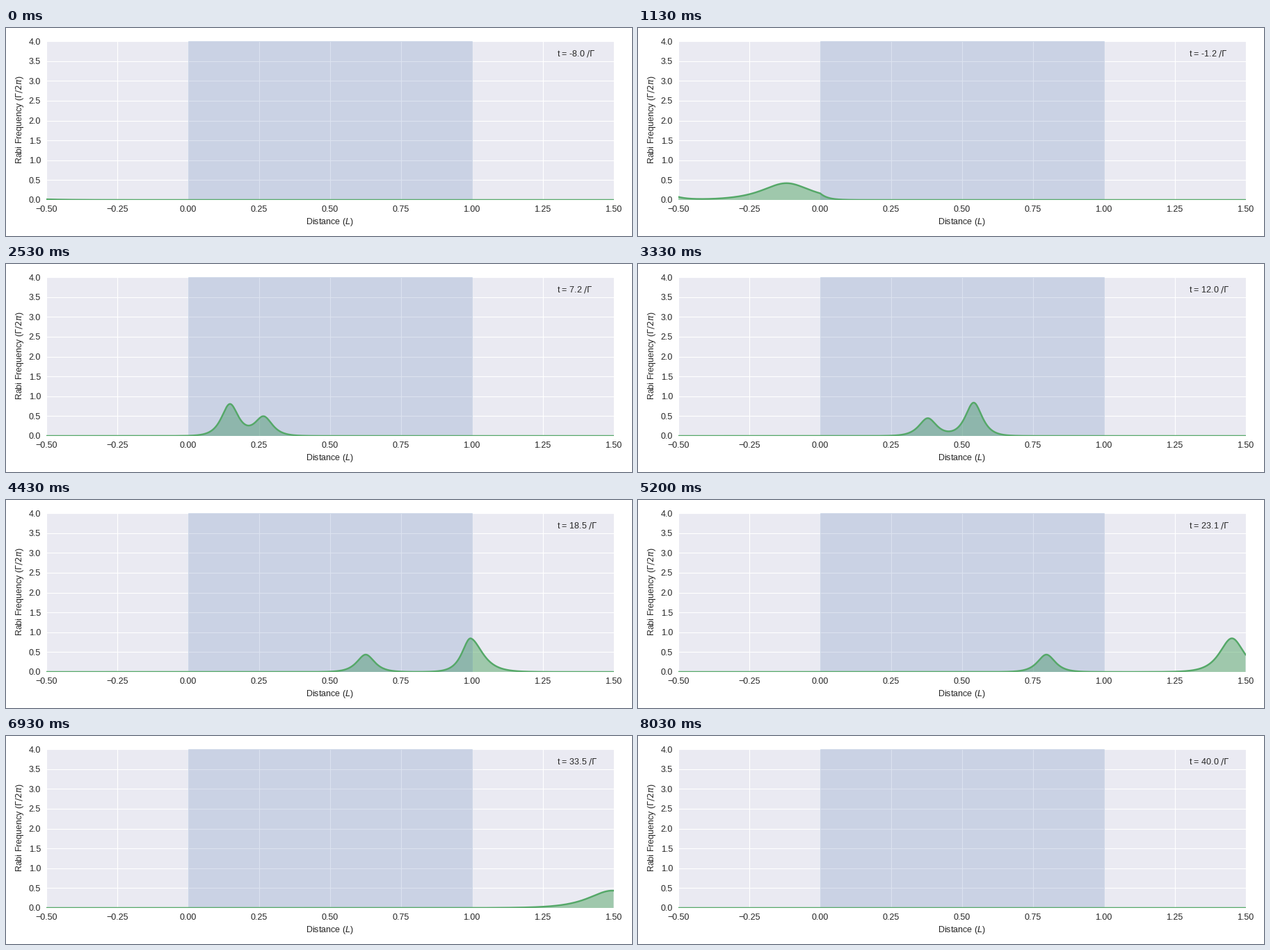
These frames come from a looping animation (900 px wide and 300 px high, 8060 ms). A matplotlib script:

```python
import numpy as np
import matplotlib.pyplot as plt
from matplotlib.animation import FuncAnimation

W, H, DPI = 900, 300, 100
LOOP_MS, TICK_MS = 8060, 20
STEP_MS, STEPS = 100 / 3, 242
LEFT, RIGHT, TOP, BOTTOM = 58, 873.5, 19, 248

C = 0.1                  # vacuum speed, medium lengths per unit time
W1, W2 = 1.3716, 2.66    # inverse durations of the slow and fast pulse
GAP = 5.0                # entry delay of the fast pulse
LAG1, LAG2 = 16.7, 4.45  # delay per medium length

BLUE, GREEN, INK = "#4C72B0", "#55A868", "#262626"

plt.rcParams.update({
    "font.family": "Liberation Sans",
    "font.size": 9,
    "mathtext.fontset": "dejavusans",
    "text.color": INK,
})


def rabi(z, t):
    """Two colliding 2-pi pulses: vacuum, medium on 0..1, vacuum."""
    tau = t - z / C
    depth = np.clip(z, 0, 1)
    settle = 1 - np.exp(-depth / 0.05)
    w1 = W1 - 0.045 * (1 - settle)
    a = (W2 - w1) / (W2 + w1)
    e1 = np.exp(w1 * (tau - LAG1 * depth - 0.15 * settle))
    e2 = np.exp(W2 * (tau - GAP - LAG2 * depth)) / a**2
    f, df = e1 + e2, w1 * e1 + W2 * e2
    cross = a**2 * e1 * e2
    g, dg = 1 - cross, -(w1 + W2) * cross
    return 4 * (df * g - f * dg) / (f**2 + g**2) / (2 * np.pi)


fig = plt.figure(figsize=(W / DPI, H / DPI), dpi=DPI, facecolor="white")
ax = fig.add_axes([LEFT / W, 1 - BOTTOM / H,
                   (RIGHT - LEFT) / W, (BOTTOM - TOP) / H],
                  facecolor="#EAEAF2")
ax.set(xlim=(-0.5, 1.5), ylim=(0, 4),
       xticks=np.arange(-0.5, 1.51, 0.25), yticks=np.arange(0, 4.1, 0.5))
ax.set_axisbelow(True)
ax.grid(color="white", linewidth=0.8)
ax.tick_params(length=0, pad=5.76, labelcolor=INK)
for spine in ax.spines.values():
    spine.set_visible(False)

z = np.linspace(-0.5, 1.5, 801)
area, = ax.fill(z, 0 * z, facecolor=GREEN, edgecolor="none", alpha=0.5)
ax.axvspan(0, 1, color=BLUE, linewidth=0.7, alpha=0.2)
line, = ax.plot(z, 0 * z, color=GREEN, linewidth=1.75)

fig.text((LEFT + RIGHT) / 2 / W, 1 - 283 / H, "Distance ($L$)",
         ha="center", va="baseline")
fig.text(23 / W, 1 - 132.5 / H, r"Rabi Frequency ($\Gamma / 2\pi$)",
         rotation=90, rotation_mode="anchor", ha="center", va="baseline")
clock = ax.text(0.9, 0.905, "", transform=ax.transAxes)


def draw(k):
    # the picture advances 30 times a second, on a finer clock
    i = int((k * TICK_MS + 15) / STEP_MS)
    t = -7.96 + 48 * min(i, STEPS - 1) / (STEPS - 1)
    y = rabi(z, t)
    line.set_ydata(y)
    area.set_xy(np.column_stack([np.r_[z[0], z, z[-1]], np.r_[0, y, 0]]))
    clock.set_text(rf"t = {t:.1f} $/\Gamma$")
    return line, area, clock


anim = FuncAnimation(fig, draw, frames=LOOP_MS // TICK_MS, interval=TICK_MS,
                     repeat=True, repeat_delay=0)
plt.show()
```
